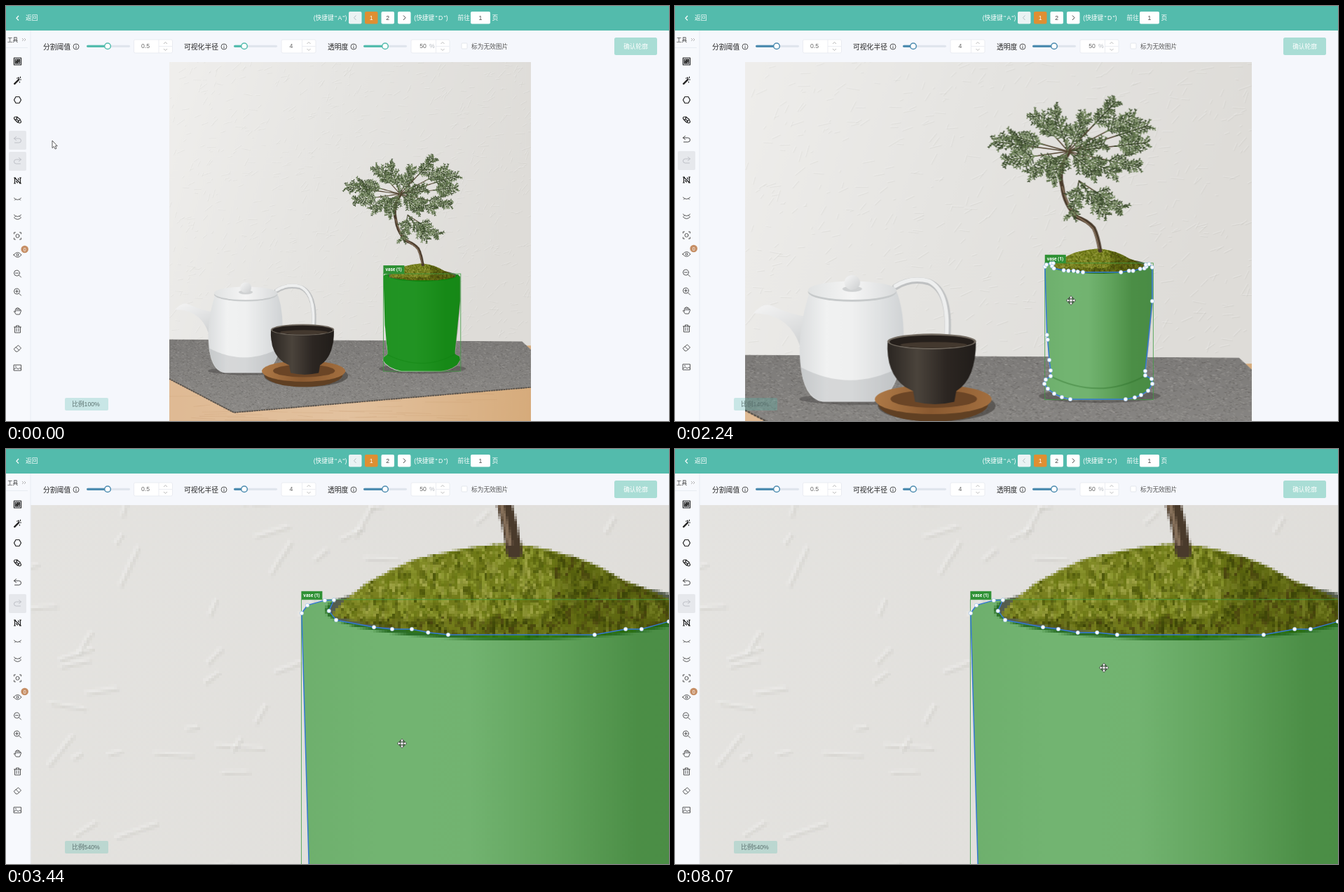
An HTML page with a canvas that plays this animation: 946x592 px, repeating every 8.13 s.

```html
<!DOCTYPE html>
<html lang="zh">
<head>
<meta charset="utf-8">
<title>轮廓标注</title>
<style>
  html, body { margin: 0; width: 100%; height: 100%; overflow: hidden; background: #f5f7fc; }
  canvas, svg { position: absolute; left: 0; top: 0; }
  svg { font: 8.7px "Liberation Sans", "Noto Sans CJK SC", sans-serif; --accent: #54bcae; }
  .label { font-size: 9.8px; fill: #222; }
  .icon { fill: none; stroke: #444; stroke-width: .9; stroke-linejoin: round; stroke-linecap: round; }
  .strong { stroke: #222; stroke-width: 1.2; }
  .box { fill: #fff; stroke: #e6e9ef; stroke-width: .8; }
  .mid { text-anchor: middle; }
</style>
</head>
<body>
<canvas id="view" width="946" height="592"></canvas>
<svg id="ui" width="946" height="592" viewBox="0 0 946 592">
  <rect x="84" y="559" width="62" height="18" rx="2" fill="#53bbac" fill-opacity=".28"/>
  <text id="ratio" class="mid" x="114" y="571.3" fill="#5b716f"></text>
  <rect x="35" y="35" width="911" height="45" fill="#f5f7fc"/>
  <rect y="35" width="35" height="557" fill="#f7f9fd"/>
  <path d="M35 35V592M0 59.5H31" stroke="#e8ecf2"/>
  <rect width="946" height="35" fill="#53bbac"/>
  <g id="header" fill="#fff"></g>
  <g id="toolbar"></g>
  <text x="2" y="51" font-size="7.6" fill="#333">工具</text>
  <path d="M23 46l2 2-2 2m3-4l2 2-2 2" fill="none" stroke="#999" stroke-width=".7"/>
  <g id="upper"></g>
  <g id="lower"></g>
  <g id="tip">
    <rect x="36" y="147" width="192" height="32" rx="2" fill="#fff" fill-opacity=".9"/>
    <text x="42" y="166" fill="#777">可将选中的目标轮廓转为多边形 ( <tspan text-decoration="underline" style="word-spacing:-.8px">快捷键 " T "</tspan>)</text>
  </g>
  <g id="loading">
    <rect x="35" y="35" width="911" height="557" fill="#fff"/>
  </g>
  <path id="spinner" d="M-10 0A10 10 0 0 1 5-8.7" fill="none" stroke="#9aaeb0" stroke-width="1.4"/>
  <g id="cursor">
    <circle id="press" cx="1" cy="3" r="6" fill="#e6dc22"/>
    <path id="arrow" d="M0 0V10.5L2.4 8.4L4.2 12L6 11.1L4.3 7.7H7.2Z" fill="#fff" stroke="#333" stroke-width=".8"/>
    <path id="hand" d="M-1 1Q0-1 1 1V5Q2 4 3 5.2Q4 4.6 5 6Q6 5.6 6 7V10L5 14H-1L-4 9Q-4.500 7-3 7.500L-1 9Z" fill="#fffbe0" stroke="#333" stroke-width=".9"/>
    <path id="move" d="M0-6.500L3-3.500H1V-1H3.500V-3L6.500 0L3.500 3V1H1V3.500H3L0 6.500L-3 3.500H-1V1H-3.500V3L-6.500 0L-3.500-3V-1H-1V-3.500H-3Z" fill="#fff" stroke="#333" stroke-width=".9"/>
  </g>
</svg>
<script>
const $ = id => document.getElementById(id);
const LOOP = 8130, PIVOT = [565, 420];
const PHOTO = { x: 233, y: 79, w: 516, h: 514, density: 1.4 };

// ---------- static interface ----------
const text = (x, y, s, extra = '') => `<text x="${x}" y="${y}" ${extra}>${s}</text>`;
const rect = (x, y, w, h, extra) => `<rect x="${x}" y="${y}" width="${w}" height="${h}" ${extra}/>`;
const path = (d, extra) => `<path d="${d}" ${extra}/>`;
const pageButton = (x, fill, s = '') => rect(x, 8, 18.5, 17.5, `rx="2" fill="${fill}"`) +
  text(x + 9.2, 19.8, s, `class="mid" fill="${fill === '#fff' ? '#444' : '#fff'}"`);

$('header').innerHTML =
  path('M18 14L15 17.300L18 20.500', 'fill="none" stroke="#fff" stroke-width="1.2"') + text(28, 20.4, '返回') +
  text(462.5, 19.6, '(快捷键 " A ")', 'class="mid" style="word-spacing:-1px"') +
  text(606.5, 19.6, '(快捷键 " D ")', 'class="mid" style="word-spacing:-1px"') +
  pageButton(489, '#ebf3f4') + pageButton(512, '#df8f32', '1') + pageButton(535.5, '#fff', '2') + pageButton(559, '#fff') +
  path('M499.500 13.500L496.500 16.700L499.500 20', 'fill="none" stroke="#b5c0c4"') +
  path('M567 13.500L570 16.700L567 20', 'fill="none" stroke="#444"') +
  text(644.5, 19.8, '前往') + rect(663, 8, 28, 17.5, 'rx="2"') +
  text(677, 19.8, '1', 'class="mid" fill="#444"') + text(693.5, 19.8, '页');

function control(label, x, info, track, knob, box, width, value) {
  const arrows = box + width - 10;
  return text(x, 61.5, label, 'class="label"') +
    `<circle cx="${info}" cy="58" r="4" fill="none" stroke="#333" stroke-width=".8"/>` +
    path(`M${info} 55.500v1m0 1v3`, 'stroke="#333" stroke-width=".9"') +
    rect(track, 55.7, 62, 3.2, 'rx="1.6" fill="#e0e5ed"') +
    rect(track, 55.7, knob - track, 3.2, 'rx="1.6" fill="var(--accent)"') +
    `<circle cx="${knob}" cy="57.300" r="4.300" fill="#fff" stroke="var(--accent)" stroke-width="1.5"/>` +
    rect(box, 48, width, 19, 'rx="2" class="box"') +
    path(`M${arrows - 9.5} 48v19m0-9.500h19`, 'stroke="#e6e9ef" stroke-width=".8"') +
    path(`M${arrows - 2.5} 54l2.500-2.500 2.500 2.500m0 7l-2.500 2.500-2.500-2.500`, 'fill="none" stroke="#aaa" stroke-width=".8"') +
    text(value[0], 60.3, value[1], 'class="mid" fill="#666"');
}
$('toolbar').innerHTML =
  control('分割阈值', 53, 100, 115, 145, 182.5, 55, [199, '0.5']) +
  control('可视化半径', 254, 311, 325, 340, 393, 49, [407, '4']) +
  control('透明度', 459, 496, 510, 541, 578, 55, [595, '50']) +
  text(604, 60.3, '%', 'fill="#b5b9c0"') +
  rect(650, 53, 8, 8, 'rx="1" fill="#fff" stroke="#dde1e8" stroke-width=".8"') +
  text(664, 60.7, '标为无效图片', 'fill="#555"') +
  rect(868, 45, 61, 25, 'rx="2.500" fill="#a9ddd5"') +
  text(898.5, 60.6, '确认轮廓', 'class="mid" fill="#fff" font-weight="500"');

const icon = (y, d, cls = '') => path(d, `id="icon${y}" class="icon ${cls}" transform="translate(16.5 ${y})"`);
const lens = 'M3-1A4 4 0 1 1-5-1A4 4 0 1 1 3-1M2 2L5 5M-3-1H1';
$('upper').innerHTML =
  icon(79, 'M-5-5H5V5H-5ZM-3-3H3V3H-3ZM-2 2L2-2M-2 0L0-2M0 2L2 0', 'strong') +
  icon(106, 'M-5 5L2-2M-4 5.500L2.500-1M1-4L2-3M4-5V-3.500M5-1H4M-1-3H0M3 2V3', 'strong') +
  icon(134, 'M-5 0L-2.500-4.500H2.500L5 0L2.500 4.500H-2.500Z', 'strong') +
  icon(162, 'M-5-2A2 2 0 1 1-1-2A2 2 0 1 1-5-2M-1-4L4 0M-4 0L0 4M1 3A2 2 0 1 1 5 3A2 2 0 1 1 1 3M-1 0L2 2', 'strong');
$('lower').innerHTML =
  rect(4, 178, 25, 27, 'id="undoBack" rx="2" fill="#e6e8ec"') + rect(4, 208, 25, 27, 'rx="2" fill="#e6e8ec"') +
  icon(191, 'M-2-4.500L-5-2L-2 .5M-5-2H2A3 3 0 0 1 2 4H-4') +
  path('M2-4.500L5-2L2 .5M5-2H-2A3 3 0 0 0-2 4H4', 'class="icon" transform="translate(16.500 221)" style="stroke:#b9bcc2"') +
  icon(249, 'M-4-4V4M4-4V4M-4-4L4 4M-5-4H-3M3-4H5M-5 4H-3M3 4H5M-2 1L0 3M1-3L2-1', 'strong') +
  icon(275, 'M-5-1Q0 4 5-1M-3 1L-4 2M3 1L4 2') +
  icon(301, 'M-5-3Q0 2 5-3M-5 1Q0 6 5 1M-3-1L-4 0M3-1L4 0') +
  icon(328, 'M-5-3V-5H-3M3-5H5V-3M5 3V5H3M-3 5H-5V3M2.500 0A2.500 2.500 0 1 1-2.500 0A2.500 2.500 0 1 1 2.500 0') +
  icon(355, 'M-5.500 0Q0-7 5.500 0Q0 7-5.500 0ZM1.500 0A1.500 1.500 0 1 1-1.500 0A1.500 1.500 0 1 1 1.500 0') +
  '<circle cx="26.700" cy="347" r="5.300" fill="#c68f66"/>' + text(26.7, 349.5, '0', 'class="mid" font-size="7" fill="#fff"') +
  icon(382, lens) + icon(408, lens + 'M-1-3V1') +
  icon(435, 'M-3 1V-3Q-2-4-1-3V-4Q0-6 1-4V-3Q2-5 3-3V-1Q5-3 5 0L3 5H-2L-5 1Q-5-1-3 1M-1-3V0M1-3V0M3-1V0') +
  icon(461, 'M-5-3H5M-2-3V-5H2V-3M-4-3V5H4V-3M-1.500-1V3M1.500-1V3') +
  icon(488, 'M-5 1L1-4L5 0L0 5H-2ZM-2-1L2 3') +
  icon(516, 'M-5-4H5V4H-5ZM-5 2L-2 0L1 2L3 0L5 2M-3-2H-2');

// ---------- photograph ----------
let seed = 7;
const rand = () => (seed = (seed * 16807) % 2147483647) / 2147483647;
const between = (a, b) => a + (b - a) * rand();
const pick = list => list[Math.floor(rand() * list.length)];

// Vase outline, clockwise from the upper left; two of the vertices get dragged.
const OUTLINE = [[538.5, 385.6], [540, 383.5], [544.6, 382.2], [547, 382.1], [545.7, 385], [547.6, 387.4], [557.6, 389.3],
  [562.4, 389.8], [567.6, 389.8], [571.9, 390.7], [577.2, 391.3], [615.9, 391.3], [624.1, 389.8], [628.3, 389.8],
  [635.5, 387.8], [639.8, 387.3], [641.8, 385.5], [641.3, 383.5], [644.5, 383], [647.8, 386.3], [647.8, 420.7],
  [640.7, 492], [640.7, 496.4], [647.1, 500], [647.9, 505], [643.6, 512], [636.4, 516.4], [630, 518.9], [620.7, 520.7],
  [564.3, 520.7], [555.7, 518.6], [547.9, 515], [541.4, 510], [537.9, 505], [539.3, 500.7], [544.3, 497.1],
  [544.3, 491.4], [542.9, 480.7], [541.2, 460], [540.5, 455.2]];

function paintPhoto() {
  const c = document.createElement('canvas');
  c.width = PHOTO.w * PHOTO.density;
  c.height = PHOTO.h * PHOTO.density;
  const g = c.getContext('2d');
  g.scale(PHOTO.density, PHOTO.density);
  g.translate(-PHOTO.x, -PHOTO.y);
  g.lineCap = 'round';

  const ramp = (x1, y1, x2, y2, ...colors) => {
    const r = g.createLinearGradient(x1, y1, x2, y2);
    colors.forEach((color, i) => r.addColorStop(i / (colors.length - 1), color));
    return r;
  };
  const fill = (d, color) => { g.fillStyle = color; g.fill(new Path2D(d)); };
  const stroke = (d, color, width) => { g.strokeStyle = color; g.lineWidth = width; g.stroke(new Path2D(d)); };
  const oval = (x, y, rx, ry, color) => {
    g.fillStyle = color; g.beginPath(); g.ellipse(x, y, rx, ry, 0, 0, 7); g.fill();
  };
  const line = (x1, y1, x2, y2, color, width) => {
    g.strokeStyle = color; g.lineWidth = width;
    g.beginPath(); g.moveTo(x1, y1); g.lineTo(x2, y2); g.stroke();
  };

  // plaster wall
  fill('M233 79H749V593H233Z', ramp(233, 79, 749, 250, '#f0efed', '#e5e4e1', '#dedcd8'));
  for (let i = 0; i < 900; i++) {
    const x = between(233, 749), y = between(79, 475), a = between(-1.3, .2), n = between(2, 13);
    const dx = Math.cos(a) * n, dy = Math.sin(a) * n;
    line(x, y, x + dx, y + dy, 'rgba(255,255,255,.22)', .9);
    line(x + .8, y + .8, x + dx + .8, y + dy + .8, 'rgba(90,85,75,.06)', .8);
  }

  // table and cloth
  fill('M233 500L749 484V593H233Z', ramp(233, 530, 749, 593, '#dfba94', '#e3c29f', '#d6ab7b'));
  for (let i = 0; i < 50; i++) {
    const x = between(233, 700), y = between(540, 593);
    line(x, y, x + between(20, 90), y + between(-2, 2), 'rgba(150,95,45,.12)', .7);
  }
  const cloth = new Path2D('M233 475L736 478L749 490V543L325 579L233 531Z');
  g.save();
  g.clip(cloth);
  g.fillStyle = ramp(0, 475, 0, 579, '#7d7b79', '#8c8a87');
  g.fill(cloth);
  for (let i = 0; i < 9000; i++) {
    const x = between(233, 749), y = between(474, 580), n = between(.6, 2.4);
    line(x, y, x + n, y + n * between(-.5, .7), pick(['#5d5b5966', '#aaa8a477', '#4d4b4955', '#b5b3af55']), .7);
  }
  g.restore();
  g.setLineDash([1.5, 2]);
  stroke('M233 531.500L325 579.500L749 543.500', '#55504b', 1.8);
  g.setLineDash([]);

  // teapot
  oval(350, 520, 62, 6, 'rgba(50,48,46,.35)');
  stroke('M386 406Q402 396 420 401Q442 410 439 456', '#bfc1c2', 6.5);
  stroke('M386 405Q402 395 420 400Q441 410 438 456', '#eeefef', 4);
  fill('M241 433Q252 420 262 426Q280 434 294 436L292 478Q286 448 266 438Q252 432 241 433Z',
    ramp(255, 423, 275, 470, '#f2f2f2', '#d2d4d5'));
  fill('M299 410Q286 450 289 482Q292 520 312 523H364Q388 518 394 470Q396 430 386 408Z',
    ramp(289, 0, 396, 0, '#dcdedf', '#f1f2f2', '#eff0f0', '#e0e2e3', '#cfd2d4'));
  fill('M290 488Q294 519 312 523H364Q383 518 390 488Q340 514 290 488Z', 'rgba(120,123,126,.22)');
  oval(342, 411, 45, 10, '#c6c9ca');
  oval(342, 409.5, 45, 9.5, ramp(297, 0, 387, 0, '#e1e3e3', '#f5f5f5', '#d9dbdc'));
  oval(342, 408, 10, 3, '#cfd1d2');
  oval(342, 401.5, 8, 7.5, ramp(335, 394, 349, 408, '#f5f5f5', '#d0d2d3'));

  // cup on its saucer
  oval(428, 527, 60, 16, 'rgba(40,36,33,.45)');
  oval(424.5, 525, 56, 18, '#604023');
  oval(424.5, 520.5, 59.5, 15, ramp(365, 506, 484, 530, '#b07b48', '#8a5a31', '#a47040'));
  oval(425, 520, 44, 9, '#6b4526');
  fill('M378 461Q376 494 396 508L404 512L406 523Q426 528 446 523L448 512Q468 500 468 461Z',
    ramp(378, 0, 468, 0, '#2b2622', '#4b443c', '#2c2622', '#211d1a'));
  oval(423, 461.5, 45.2, 8, '#70685e');
  oval(423, 461.8, 43, 6.5, '#251f1b');
  oval(425, 465, 34, 3, '#43382e');

  // vase
  oval(594, 517, 62, 7, 'rgba(40,38,36,.35)');
  g.beginPath();
  OUTLINE.forEach(p => g.lineTo(...p));
  g.closePath();
  g.fillStyle = g.strokeStyle = ramp(538, 0, 649, 0, '#dddedb', '#e6e8e4', '#e5e6e2', '#c3c6ba', '#999c8e', '#93978a');
  g.lineWidth = 1;
  g.fill();
  g.stroke();
  stroke('M544 497Q594 522 641 496', 'rgba(70,75,65,.35)', 1.4);
  oval(594, 384.5, 49.5, 8, '#545c4e');

  // moss
  const moss = new Path2D('M546 386Q553 377 569 371Q580 368 594 367Q612 369 624 377Q636 381 642 386Q632 390 616 391Q595 393 577 391Q556 389 546 386Z');
  g.fillStyle = ramp(546, 0, 642, 0, '#7c8222', '#6d7716', '#535b0e');
  g.fill(moss);
  g.save();
  g.clip(moss);
  for (let i = 0; i < 2200; i++) {
    const x = between(546, 643), y = between(366, 393), shade = x > 605 || y > 386;
    line(x, y, x + between(-.8, .8), y + between(.4, 1.8),
      pick(shade ? ['#3d4508', '#59640f', '#747d23', '#4b4510'] : ['#8f9a32', '#6d7a15', '#4f5a0c', '#a1a548']), .7);
  }
  g.restore();

  // tree
  stroke('M594.500 369Q592 354 588 346Q581 338 571 335Q558 322 556 304Q551 287 562 270', '#493a2b', 4);
  stroke('M593.300 367Q591 354 587 346Q580 339 570 334Q560 322 556 304', '#86705a', 1.3);
  function frond(x, y, angle, length, level) {
    const dx = Math.cos(angle) * length, dy = Math.sin(angle) * length;
    line(x, y, x + dx, y + dy, pick(['#405033', '#566a43', '#6e8258', '#354427', '#7d9068']), 1.1);
    const n = level ? Math.ceil(length / 3.6) : 0;
    for (let i = 1; i <= n; i++) for (const side of [-1, 1])
      frond(x + dx * i / n, y + dy * i / n, angle + side * between(.6, 1),
        length * .34 * between(.6, 1.3) * (1 - .4 * i / n), level - 1);
  }
  const tips = [[487, 258], [498, 277], [505, 252], [528, 230], [524, 290], [548, 227], [580, 231], [610, 218], [629, 233],
    [642, 242], [642, 259], [633, 284], [610, 290], [545, 297], [590, 292], [560, 257], [598, 260],
    [616, 326], [600, 332], [566, 333], [580, 306]];
  tips.forEach(([x, y], i) => {
    const [hx, hy] = i < 17 ? [562, 268] : [573, 298];
    const angle = Math.atan2(y - hy, x - hx), length = Math.min(33, Math.hypot(x - hx, y - hy));
    line(hx, hy, x, y, '#51432f', 1.1);
    frond(x - Math.cos(angle) * length, y - Math.sin(angle) * length, angle, length, 2);
  });
  return c;
}
const photo = paintPhoto();

// ---------- motion ----------
const ZOOM = [[0, 1], [2240, 1.4], [2310, 2], [2380, 2.4], [2640, 3], [2710, 3.6], [2780, 4], [2970, 4.4],
  [3040, 4.8], [3370, 5.2], [3440, 5.4]];
const CURSOR = [[0, 66, 192], [60, 66, 192], [350, 16, 158], [690, 16, 158], [1170, 473, 370], [1440, 565, 420],
  [4430, 565, 420], [4800, 636, 345], [5080, 643, 290], [5240, 619, 265], [5450, 577, 258], [6130, 577, 258],
  [6260, 574, 262], [6470, 574, 262], [6730, 551, 260], [7160, 551, 260], [7420, 547, 260], [7610, 547, 260], [8060, 612, 312]];
const TIP = [[0, 0], [500, 0], [620, 1], [1000, 1], [1170, .5], [1310, 0]];
const LOADING = [[0, 0], [640, 0], [850, .75], [1030, .75], [1170, .36], [1440, 0]];
const DRAGS = [{ index: 8, from: 6130, to: 6260, dx: -.8, dy: .95 }, { index: 7, from: 7160, to: 7420, dx: -.75, dy: 0 }];
const PRESSES = [[550, 690], [5780, 6230], [6880, 7390]];

const during = (t, a, b) => t >= a && t < b;
function tween(keys, t) {
  const i = keys.findIndex(k => k[0] > t);
  if (i < 0) return keys[keys.length - 1].slice(1);
  const [a, b] = [keys[i - 1], keys[i]], f = (t - a[0]) / (b[0] - a[0]);
  return a.slice(1).map((v, j) => v + (b[j + 1] - v) * f);
}
function cursorKind(t) {
  if (during(t, 300, 700) || during(t, 5400, 7740)) return 'hand';
  return t < 1400 ? 'arrow' : 'move';
}

const ctx = $('view').getContext('2d');
function drawScene(t, scale, polygonMode) {
  const project = ([x, y]) => [PIVOT[0] + (x - PIVOT[0]) * scale, PIVOT[1] + (y - PIVOT[1]) * scale];
  ctx.clearRect(0, 0, 946, 592);
  ctx.imageSmoothingEnabled = scale < 2;
  ctx.drawImage(photo, ...project([PHOTO.x, PHOTO.y]), PHOTO.w * scale, PHOTO.h * scale);

  const points = OUTLINE.map(p => [...p]);
  for (const { index, from, to, dx, dy } of DRAGS) {
    const f = Math.min(1, Math.max(0, (t - from) / (to - from)));
    points[index][0] += dx * f;
    points[index][1] += dy * f;
  }
  const dots = points.map(project);
  ctx.beginPath();
  dots.forEach(p => ctx.lineTo(...p));
  ctx.closePath();
  ctx.fillStyle = polygonMode ? 'rgba(0,130,0,.5)' : 'rgba(2,134,4,.86)';
  ctx.fill();

  const [left, top] = project([538.4, 382]), [right, bottom] = project([648.8, 521]);
  ctx.strokeStyle = '#3f9d43';
  ctx.lineWidth = .8;
  ctx.strokeRect(left, top, right - left, bottom - top);
  ctx.fillStyle = '#2f9135';
  ctx.fillRect(left, top - 12, 30, 12);
  ctx.fillStyle = '#fff';
  ctx.font = '700 6.2px "Open Sans", "Liberation Sans", sans-serif';
  ctx.fillText('vase (1)', left + 3, top - 3.8);

  if (!polygonMode) return;
  ctx.strokeStyle = '#3478d4';
  ctx.lineWidth = 1.5;
  ctx.stroke();
  ctx.fillStyle = '#fff';
  ctx.strokeStyle = '#8db7e2';
  ctx.lineWidth = .6;
  for (const [x, y] of dots) {
    ctx.beginPath();
    ctx.arc(x, y, 2.7, 0, 7);
    ctx.fill();
    ctx.stroke();
  }
}

function render(now) {
  const t = now % LOOP;
  const scale = ZOOM.filter(k => k[0] <= t).pop()[1];
  const polygonMode = t >= 1100;
  drawScene(t, scale, polygonMode);

  $('ratio').textContent = `比例${Math.round(scale * 100)}%`;
  $('ui').style.setProperty('--accent', t < 1370 ? '#54bcae' : '#4d8cb0');
  $('lower').setAttribute('transform', `translate(0 ${polygonMode ? -1 : 0})`);
  $('undoBack').style.opacity = polygonMode ? 0 : 1;
  $('icon191').style.stroke = polygonMode ? '#333' : '#b9bcc2';

  const [veil] = tween(LOADING, t);
  $('tip').style.opacity = tween(TIP, t)[0];
  $('loading').style.opacity = veil;
  $('spinner').style.opacity = veil * 1.3;
  $('spinner').setAttribute('transform', `translate(490.5 314.5) rotate(${(t - 1170) * .18})`);

  const kind = cursorKind(t);
  for (const id of ['arrow', 'hand', 'move']) $(id).style.display = id === kind ? '' : 'none';
  $('press').style.display = PRESSES.some(([a, b]) => during(t, a, b)) ? '' : 'none';
  $('cursor').setAttribute('transform', `translate(${tween(CURSOR, t).join(' ')})`);
}

const start = performance.now();
function tick() {
  render(performance.now() - start);
  requestAnimationFrame(tick);
}
tick();
</script>
</body>
</html>
```
